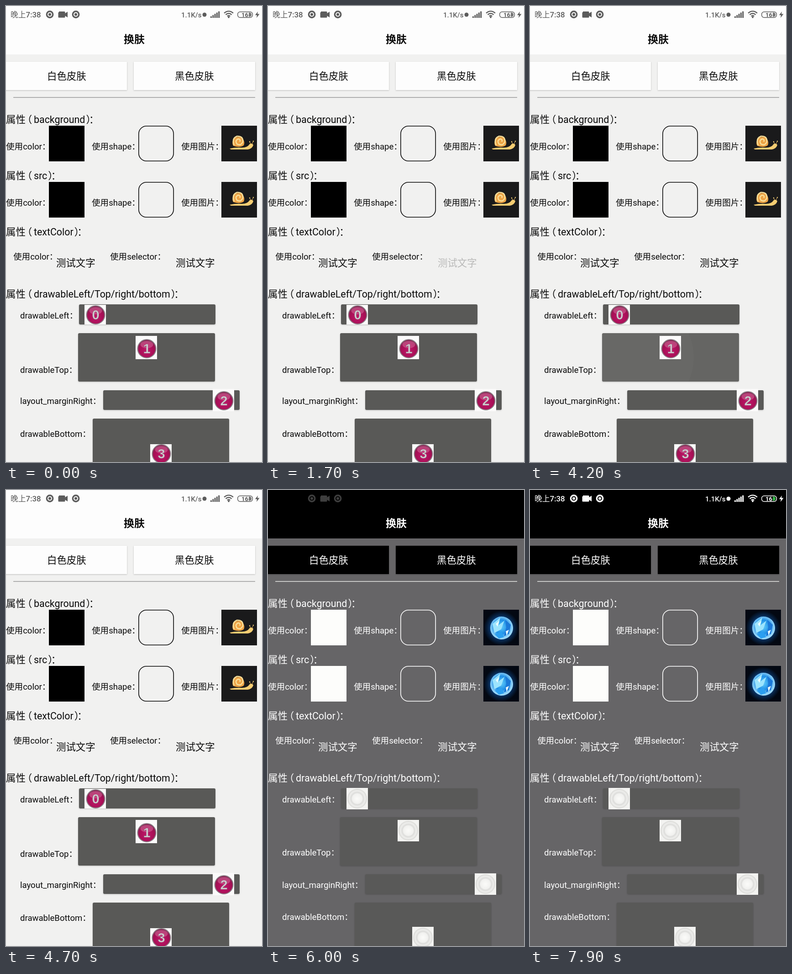
Animation, 561 px wide and 998 px high, one loop 8 s. Source, as an HTML page:

```html
<!DOCTYPE html>
<html lang="zh-CN">
<head>
<meta charset="utf-8">
<title>换肤</title>
<style>
  html, body { margin: 0; width: 100%; height: 100%; overflow: hidden; background: #f1f1f0; }
  svg { display: block; width: 100vw; height: 100vh; font-family: Roboto, "Noto Sans CJK SC", "Noto Sans CJK", sans-serif; }
  text { fill: currentColor; white-space: pre; }
  .head { font-size: 21.4px; }
  .label { font-size: 18.57px; }
  .title { font-size: 22.9px; font-weight: 700; }
  .digit { font: bold 29px "Liberation Sans", Arial, sans-serif; text-anchor: middle; fill: #d3cdd1; stroke: #8b5b73; stroke-width: .7; }
  .light { color: #0a0a0a; }
  .dark { color: #fff; opacity: 0; }
  .card { filter: drop-shadow(0 1.5px 1.5px rgba(0, 0, 0, .22)); }
  .status { color: #5c5c5c; font-weight: 500; }
</style>
</head>
<body>
<svg viewBox="0 0 561 998" preserveAspectRatio="none">
  <defs>
    <radialGradient id="berry" cx=".5" cy=".62" r=".6">
      <stop offset="0" stop-color="#c2166a"/><stop offset=".7" stop-color="#a60f55"/><stop offset="1" stop-color="#7d2750"/>
    </radialGradient>
    <radialGradient id="pearl">
      <stop offset="0" stop-color="#fbfbf9"/><stop offset=".5" stop-color="#f1f1ef"/><stop offset=".62" stop-color="#dcdcda"/>
      <stop offset=".8" stop-color="#eeeeec"/><stop offset="1" stop-color="#d9d9d6"/>
    </radialGradient>
    <radialGradient id="glow">
      <stop offset=".5" stop-color="#0d58a8"/><stop offset=".72" stop-color="#08284f"/><stop offset="1" stop-color="#030812"/>
    </radialGradient>
    <radialGradient id="orb" cx=".48" cy=".45">
      <stop offset="0" stop-color="#62cdfb"/><stop offset=".6" stop-color="#1f8fe6"/><stop offset="1" stop-color="#9bd9fa"/>
    </radialGradient>
    <clipPath id="press"><rect x="158" y="716" width="300" height="106" rx="3"/></clipPath>

    <g id="snail">
      <rect width="78" height="78" fill="#1a1a1b"/>
      <path d="M18 50Q33 47 45 48Q57 48 62 40Q67 37 70 42Q68 50 58 52L21 52Z" fill="#f6cd72"/>
      <path d="M26 44A13 13 0 1 1 49 43Q40 49 26 44Z" fill="#eda345"/>
      <path d="M28 43Q22 28 34 23Q48 22 47 35Q43 45 34 40Q29 32 37 29Q43 30 40 35" fill="none" stroke="#f9df9a" stroke-width="2.6"/>
      <path d="M64 40L62 35M67 40L70 34" stroke="#e9b963" stroke-width="1"/>
      <circle cx="62" cy="35" r="1.2" fill="#f2cf78"/><circle cx="70" cy="34" r="1.2" fill="#f2cf78"/>
    </g>
    <g id="crystal">
      <rect width="78" height="78" fill="#030812"/>
      <circle cx="39" cy="40" r="38" fill="url(#glow)"/>
      <circle cx="40" cy="40" r="25" fill="url(#orb)"/>
      <path d="M20 31L37 17L33 34L46 24L39 43L24 51Z" fill="#9ce4fd"/>
      <path d="M48 22L60 33L56 53L45 58L50 39Z" fill="#1c79d8"/>
      <path d="M25 54L40 47L45 60L34 63Z" fill="#2b9ff0"/>
      <path d="M27 31L35 24L31 37ZM49 47L56 44L51 57Z" fill="#e9fbff"/>
    </g>
  </defs>
  <g id="stage"></g>
</svg>
<script>
const LOOP = 8000;
const stage = document.getElementById('stage');

const themes = {
  light: { page: '#f1f1f0', bar: '#fdfdfd', line: '#a0a09f', swatch: '#000', picture: 'snail', box: '#595957', topY: 803, bottomY: 943 },
  dark: { page: '#666567', bar: '#000', line: '#dededc', swatch: '#fdfdfb', picture: 'crystal', box: '#595958', topY: 800, bottomY: 941 }
};

const rect = (x, y, w, h, fill, extra = '') =>
  `<rect x="${x}" y="${y}" width="${w}" height="${h}" fill="${fill}" ${extra}/>`;
const text = (x, y, cls, str, extra = '') =>
  `<text x="${x}" y="${y}" class="${cls}" ${extra}>${str}</text>`;
const heading = (y, name) => text(0, y, 'head',
  `属性<tspan dx="-7">（</tspan><tspan dx="3.8">${name}</tspan><tspan dx="2">）</tspan><tspan dx="-4.2">：</tspan>`);

function swatchRow(y, theme) {
  return text(0, y + 51.5, 'label', '使用color：') + rect(94, y, 78, 78, theme.swatch)
    + text(188, y + 51.5, 'label', '使用shape：')
    + rect(290.8, y + .8, 76.4, 76.4, 'none', 'rx="17" stroke="currentColor" stroke-width="1.6"')
    + text(384, y + 51.5, 'label', '使用图片：')
    + `<use href="#${theme.picture}" x="472" y="${y}"/>`;
}

function berry(x, y, h, cy, digit) {
  return rect(x, y, 47, h, '#fbfafa')
    + `<circle cx="${x + 24.5}" cy="${cy}" r="20" fill="url(#berry)" stroke="#8d7f87" stroke-width="2"/>`
    + `<ellipse cx="${x + 24.5}" cy="${cy - 9}" rx="14" ry="8" fill="#e58ab5" opacity=".4"/>`
    + text(x + 24.5, cy + 10, 'digit', digit);
}

function pearl(x, y) {
  return rect(x, y, 47, 47, '#f3f3f1')
    + `<circle cx="${x + 23.5}" cy="${y + 23.5}" r="21.5" fill="url(#pearl)"/>`;
}

const boxes = [[160, 653, 299, 44], [158, 716, 300, 106], [213, 841, 299, 43], [190, 903, 299, 110]];

function scene(name) {
  const theme = themes[name];
  const balls = name === 'light'
    ? berry(172, 654, 43, 676, 0) + berry(284, 722, 51, 750, 1) + berry(453, 838, 49, 864, 2) + berry(316, 959, 51, 980, 3)
    : pearl(172, 652) + pearl(284, 722) + pearl(453, 839) + pearl(316, 956);
  const ripple = name === 'light'
    ? `<g clip-path="url(#press)">${rect(158, 716, 300, 106, '#fff', 'id="wash" opacity="0"')}
       <circle id="ripple" cy="769" fill="#fff" opacity="0"/></g>` : '';
  return `<g class="${name}">`
    + rect(0, 0, 561, 998, theme.page) + rect(0, 0, 561, 106, theme.bar)
    + text(281, 80.5, 'title', '换肤', 'text-anchor="middle"')
    + rect(-4, 122, 269, 62, theme.bar, 'class="card"') + rect(280, 122, 266, 62, theme.bar, 'class="card"')
    + text(90, 161, 'head', '白色皮肤') + text(370, 161, 'head', '黑色皮肤')
    + rect(16, 199.4, 530, 1.6, theme.line)
    + heading(256, 'background') + swatchRow(262, theme)
    + heading(379, 'src') + swatchRow(385, theme)
    + heading(502, 'textColor')
    + text(16, 554.5, 'label', '使用color：') + text(110, 570, 'head', '测试文字')
    + text(228, 554.5, 'label', '使用selector：') + text(372, 570, 'head selector', '测试文字')
    + heading(638, 'drawableLeft/Top/right/bottom')
    + text(31, 684, 'label', 'drawableLeft：') + text(31, theme.topY, 'label', 'drawableTop：')
    + text(31, 871, 'label', 'layout_marginRight：') + text(31, theme.bottomY, 'label', 'drawableBottom：')
    + boxes.map(b => rect(...b, theme.box, 'rx="3" class="card"')).join('')
    + ripple + balls + '</g>';
}

function statusBar() {
  const record = x => `<circle cx="${x}" cy="18.5" r="6.7" fill="none" stroke="currentColor" stroke-width="3.4"/>
    <circle cx="${x}" cy="18.5" r="3" fill="currentColor"/>`;
  const bars = [0, 1, 2, 3, 4].map(i => rect(448 + i * 4.3, 22.5 - i * 2.7, 3, 3.5 + i * 2.7, 'currentColor')).join('');
  const arcs = [[11, 15.5], [7.2, 19], [3.6, 22.3]].map(([r, y]) =>
    `<path d="M${488 - r * .9} ${y}Q488 ${y - r * .75} ${488 + r * .9} ${y}" fill="none" stroke="currentColor" stroke-width="2.4"/>`).join('');
  return `<g class="status icons">${record(96)}${record(153)}
      <path d="M116 12h12q1.500 0 1.500 1.500v2.500l5.500-3.500v12.500l-5.500-3.500v2.500q0 1.500-1.500 1.500h-12q-1.500 0-1.500-1.500v-9q0-1.500 1.500-1.500z" fill="currentColor"/></g>
    <g class="status info">${text(10, 25, '', '晚上7:38', 'font-size="16.8"')}${text(384, 24.5, '', '1.1K/s', 'font-size="15"')}
      <circle cx="435" cy="19" r="4.5" fill="currentColor"/>${bars}${arcs}
      <circle cx="488" cy="24.500" r="2" fill="currentColor"/>
      <rect x="507.700" y="12.700" width="32.600" height="12.600" rx="5.500" fill="none" stroke="currentColor" stroke-width="1.500"/>
      <path id="charge" d="M532 14.500h2q4 0 4 4.500t-4 4.500h-2z" fill="#777"/>
      ${text(516, 23.7, '', '16', 'font-size="13" font-weight="700"')}
      <path d="M552 12l-6 8h4l-1 6 6.500-8.500h-4.500z" fill="currentColor"/></g>`;
}

stage.innerHTML = scene('light') + scene('dark') + statusBar();

// Each step is [time, value]; values either jump or glide between steps.
function play(selector, prop, steps, easing = 'steps(1, end)') {
  const last = steps[steps.length - 1][1];
  const frames = [...steps, [LOOP, last]].map(([time, value]) => ({ offset: time / LOOP, [prop]: value, easing }));
  stage.querySelector(selector).animate(frames, { duration: LOOP, iterations: Infinity }).startTime = 0;
}

const SWITCH = 5990;
play('.light .selector', 'fill', [[0, '#0a0a0a'], [1500, '#b9b9b8'], [1990, '#0a0a0a']]);
play('#wash', 'opacity', [[0, 0], [3990, 0], [4150, .07], [4350, .07], [4600, 0]], 'linear');
play('#ripple', 'opacity', [[0, 0], [3990, 0], [4150, .025], [4350, .025], [4600, 0]], 'linear');
play('#ripple', 'r', [[0, '60px'], [3990, '60px'], [4200, '130px'], [4400, '190px']], 'linear');
play('#ripple', 'cx', [[0, '190px'], [3990, '190px'], [4200, '228px'], [4400, '300px']], 'linear');
play('.dark', 'opacity', [[0, 0], [SWITCH, 1]]);
play('.icons', 'color', [[0, '#5c5c5c'], [SWITCH, '#3e3e3e'], [6090, '#c4c4c4'], [6190, '#fff']]);
play('.info', 'color', [[0, '#5c5c5c'], [SWITCH, '#000'], [6090, '#b4b4b4'], [6190, '#fff']]);
play('#charge', 'fill', [[0, '#777'], [SWITCH, '#000'], [6090, '#32b545']]);
</script>
</body>
</html>
```
